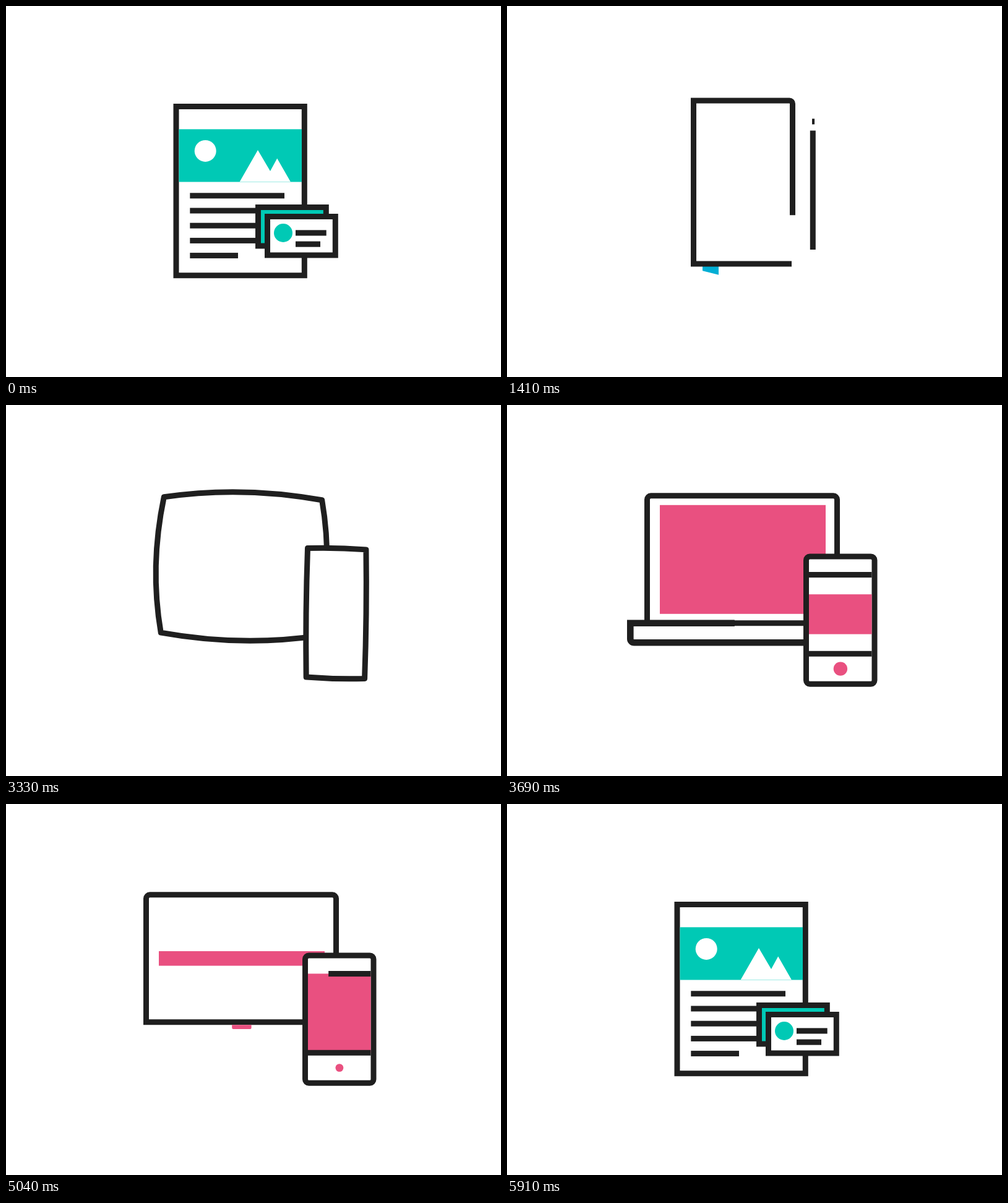
Write an HTML page with a canvas that moves like this. It is 800 px wide and 600 px high and loops after 6090 ms.

```html
<!DOCTYPE html>
<html lang="en">
<head>
<meta charset="utf-8">
<title>Stationery to screens</title>
<style>
html, body { margin: 0; width: 100%; height: 100%; overflow: hidden; background: #fff; }
canvas { display: block; }
</style>
</head>
<body>
<canvas id="stage" width="800" height="600"></canvas>
<script>
const ctx = document.getElementById('stage').getContext('2d');
const LOOP = 6090;
const INK = '#1f1f1f', WHITE = '#fff', GREEN = '#00c9b5', BLUE = '#00aed4', PINK = '#e95080';

// Outlines as left, top, right, bottom of the stroke's centre line
const BOOK = [301.5, 153, 461.5, 417];
const PENCIL = [494.3, 158, 516, 394];
const SCREEN = [226.5, 146.8, 533.5, 352.8];
const PHONE = [483.5, 245, 594, 451.3];
const DOC = [275, 162.5, 482.3, 435.7];
const CARD = [422.5, 340.5, 532.3, 403];
const TEXT_ENDS = [450, 407, 407, 407, 375];

let now = 0;
const quad = u => u < 0.5 ? 2 * u * u : 1 - 2 * (1 - u) * (1 - u);
const backOut = u => 1 + 3.1 * (u - 1) ** 3 + 2.1 * (u - 1) ** 2;
const span = (a, b, ease = quad) => ease(Math.min(1, Math.max(0, (now - a) / (b - a))));
const mix = (a, b, p) => a + (b - a) * p;
const mixAll = (a, b, p) => a.map((v, i) => mix(v, b[i], p));
const arch = p => Math.sin(Math.PI * p);

function rect(color, l, t, r, b) {
  if (r <= l || b <= t) return;
  ctx.fillStyle = color;
  ctx.fillRect(l, t, r - l, b - t);
}

function disc(color, x, y, r) {
  ctx.fillStyle = color;
  ctx.beginPath();
  ctx.arc(x, y, Math.max(0, r), 0, Math.PI * 2);
  ctx.fill();
}

function poly(color, pts) {
  ctx.fillStyle = color;
  ctx.beginPath();
  pts.forEach(([x, y]) => ctx.lineTo(x, y));
  ctx.fill();
}

function clipTo(l, t, r, b, draw) {
  ctx.save();
  ctx.beginPath();
  ctx.rect(l, t, r - l, b - t);
  ctx.clip();
  draw();
  ctx.restore();
}

function inked(width = 9, join = 'miter') {
  ctx.strokeStyle = INK;
  ctx.lineWidth = width;
  ctx.lineJoin = join;
}

// Filled box with an outline; radii are given clockwise from top left
function box([l, t, r, b], radii, fill = WHITE) {
  ctx.beginPath();
  ctx.roundRect(l, t, r - l, b - t, radii);
  ctx.fillStyle = fill;
  ctx.fill();
  inked();
  ctx.stroke();
}

// Box in mid-change: corners slip round and the sides bow
function softBox([l, t, r, b], slip, bow) {
  const x = (l + r) / 2, y = (t + b) / 2;
  ctx.beginPath();
  ctx.moveTo(l + slip, t);
  ctx.quadraticCurveTo(x, t - bow, r, t + slip);
  ctx.quadraticCurveTo(r + bow, y, r - slip, b);
  ctx.quadraticCurveTo(x, b + bow, l, b - slip);
  ctx.quadraticCurveTo(l - bow, y, l + slip, t);
  ctx.closePath();
  ctx.fillStyle = WHITE;
  ctx.fill();
  inked(9, 'round');
  ctx.stroke();
}

function morph(from, to, p, fromRadii, toRadii, slip, bow) {
  if (p <= 0) box(from, fromRadii);
  else if (p >= 1) box(to, toRadii);
  else softBox(mixAll(from, to, p), slip * arch(p), bow * arch(p));
}

// Draws the first part p of a line through points [x, y, corner radius]
function trace(pts, p, width) {
  if (p <= 0) return;
  let length = 0;
  ctx.beginPath();
  pts.forEach(([x, y, r = 0], i) => {
    if (!i) return ctx.moveTo(x, y);
    length += Math.hypot(x - pts[i - 1][0], y - pts[i - 1][1]) - 0.43 * r;
    if (r) ctx.arcTo(x, y, ...pts[i + 1].slice(0, 2), r);
    else ctx.lineTo(x, y);
  });
  inked(width);
  if (p < 1) ctx.setLineDash([length * p, length * 2]);
  ctx.stroke();
  ctx.setLineDash([]);
}

const around = ([l, t, r, b]) => [[r, b], [l, b], [l, t], [r, t], [r, b]];

function picture(panel, sun, hills) {
  const r = mix(279.5, 478, panel);
  rect(GREEN, 279.5, 199.3, r, 284.5);
  clipTo(279, 199, Math.max(279, r), 284.6, () => {
    disc(WHITE, 322.2, 234.4, 17.5 * sun);
    const d = 53 * (1 - hills);
    poly(WHITE, [[377.5, 284.6 + d], [407, 233 + d], [427, 267 + d], [438.2, 246.5 + d], [460, 284.6 + d]]);
  });
}

function textLines(progress) {
  TEXT_ENDS.forEach((end, i) => {
    const y = 302.3 + 24.2 * i;
    rect(INK, 297.3, y, mix(297.3, end, progress(i)), y + 9);
  });
}

function backCard(front, p) {
  if (p > 0) box(front.map(v => v - 15 * p), 0, GREEN);
}

function cardDetails(p) {
  disc(GREEN, 448, 367, 15 * p);
  rect(INK, 468, 362.4, mix(468, 517.7, p), 371.5);
  rect(INK, 468, 380.6, mix(468, 508, p), 389.7);
}

function documentLeaves() {
  const sheet = 1 - span(570, 810), card = 1 - span(540, 740);
  if (sheet < 1) trace(around(DOC), sheet, 9);
  else box(DOC, 0);
  picture(1 - span(420, 600), 1 - span(390, 510), 1 - span(390, 530));
  textLines(i => 1 - span(400 + 35 * i, 510 + 35 * i));
  backCard(CARD, 1 - span(450, 570));
  if (card < 1) trace(around(CARD), card, 9);
  else box(CARD, 0);
  cardDetails(1 - span(390, 520));
}

function bookmark(scale) {
  if (scale <= 0) return;
  clipTo(310, 417, 350, 460, () =>
    poly(BLUE, [[316, 414], [342, 414], [342, 414 + 30.8 * scale], [316, 414 + 21 * scale]]));
}

function pencilDetails(fill, tip, band) {
  rect(BLUE, 498.6, 191, 511.6, mix(191, 395, fill));
  rect(INK, 493, 182.3, mix(493, 516, band), 191.4);
  if (tip <= 0) return;
  clipTo(488, 385, 523, mix(394, 432, tip), () => {
    poly(INK, [[489.8, 394], [498.8, 394], [505.1, 401], [511.5, 394], [520.5, 394], [505.1, 431.5]]);
    poly(WHITE, [[498.8, 393.5], [505.1, 387], [511.5, 393.5], [508.2, 402], [502, 402]]);
  });
}

function notebook() {
  const leaving = now >= 2820;
  bookmark(leaving ? 1 - span(2820, 2960) : span(1370, 1610, backOut));
  const [l, t, r, b] = BOOK;
  const cover = span(1170, 1475);
  if (cover < 1) trace([[460, b], [l, b], [l, t], [r, t, 5], [r, b - 5]], cover, 9);
  else box(BOOK, [0, 5, 5, 0]);

  const strap = span(1500, 1700), off = span(2820, 2980);
  rect(BLUE, 421.8, mix(145.8, 425.6, off), 441, mix(145.8, 425.6, strap));

  const [pl, pt, pr, pb] = PENCIL;
  trace([[pl, pb], [pl, pt, 4], [pr, pt, 4], [pr, pb]], span(1290, 1563), 9);
  pencilDetails(
    leaving ? 1 - span(2820, 2930) : span(1770, 1950),
    leaving ? 1 - span(2860, 2970) : span(1560, 1690),
    leaving ? 1 - span(2850, 2960) : span(1365, 1520));
}

function phoneDetails(frame) {
  const leaving = now >= 4710;
  const [l, t, r, b] = frame;
  const dx = l - PHONE[0], dy = t - PHONE[1];
  clipTo(l + 4.5, t + 4.5, r - 4.5, b - 4.5, () => {
    ctx.translate(dx, dy);
    const half = leaving
      ? mix(32.2, 64, span(4830, 5040)) * (1 - span(5040, 5190))
      : 32.2 * span(3450, 3630);
    rect(PINK, 486, 338.4 - half, 592, 338.4 + half);
    rect(INK, mix(488, 590, span(4920, 5220)), 270, mix(488, 590, span(3400, 3560)), 279.1);
    rect(INK, mix(488, 590, span(5050, 5250)), 397.8, mix(488, 590, span(3440, 3600)), 406.8);
    disc(PINK, 538.9, 426.6, 11.2 * (leaving ? 1 - span(4860, 5253) : span(3480, 3660)));
  });
}

function laptop() {
  const leaving = now >= 4710;
  morph(BOOK, SCREEN, span(3000, 3550), [0, 5, 5, 0], [6, 6, 0, 0], 6, 22);

  const half = 88 * (leaving ? 1 - span(4740, 5146) : span(3480, 3660));
  rect(PINK, 247, 249.8 - half, 515, 249.8 + half);

  const base = leaving ? 1 - span(4710, 4980) : span(3480, 3819);
  trace([[566, 384.3], [199.3, 384.3, 6], [199.3, 352.7], [561, 352.7], [561, 384.3]], base, 10.6);

  const notch = 10 * (leaving ? 1 - span(4980, 5130) : span(3800, 3990));
  if (notch > 0.2) {
    ctx.fillStyle = PINK;
    ctx.beginPath();
    ctx.roundRect(365.2, 357.3, 31.4, notch, [0, 0, 2, 2]);
    ctx.fill();
  }
}

function documentReturns() {
  morph(SCREEN, DOC, span(5160, 5460), [6, 6, 0, 0], 0, 5, 8);
  textLines(i => span(5573 - 52 * i, 5623 - 52 * i));
  picture(span(5590, 5780), span(5720, 5870), span(5700, 5880));
}

function phoneToCard() {
  const p = span(5115, 5637), low = span(5222, 5842);
  const frame = mixAll(PHONE, CARD, p);
  frame[3] = mix(PHONE[3], CARD[3], low);
  backCard(frame, span(5640, 5820));
  if (p <= 0) box(PHONE, 6);
  else if (p < 1) softBox(frame, 5 * arch(p), 1.5 * arch(p));
  else box(frame, 0);
  if (now < 5260) phoneDetails(frame);
  cardDetails(span(5720, 5910));
}

function pencilToPhone() {
  const p = span(2970, 3470);
  morph(PENCIL, PHONE, p, 4, 6, 5, 3);
  if (p > 0.8) phoneDetails(mixAll(PENCIL, PHONE, p));
}

function draw() {
  rect(WHITE, 0, 0, 800, 600);
  if (now < 810) documentLeaves();
  else if (now < 1170) return;
  else if (now < 2970) notebook();
  else {
    if (now < 5160) laptop();
    else documentReturns();
    if (now < 4710) pencilToPhone();
    else phoneToCard();
  }
}

function tick() {
  now = performance.now() % LOOP;
  draw();
  requestAnimationFrame(tick);
}
tick();
</script>
</body>
</html>
```
